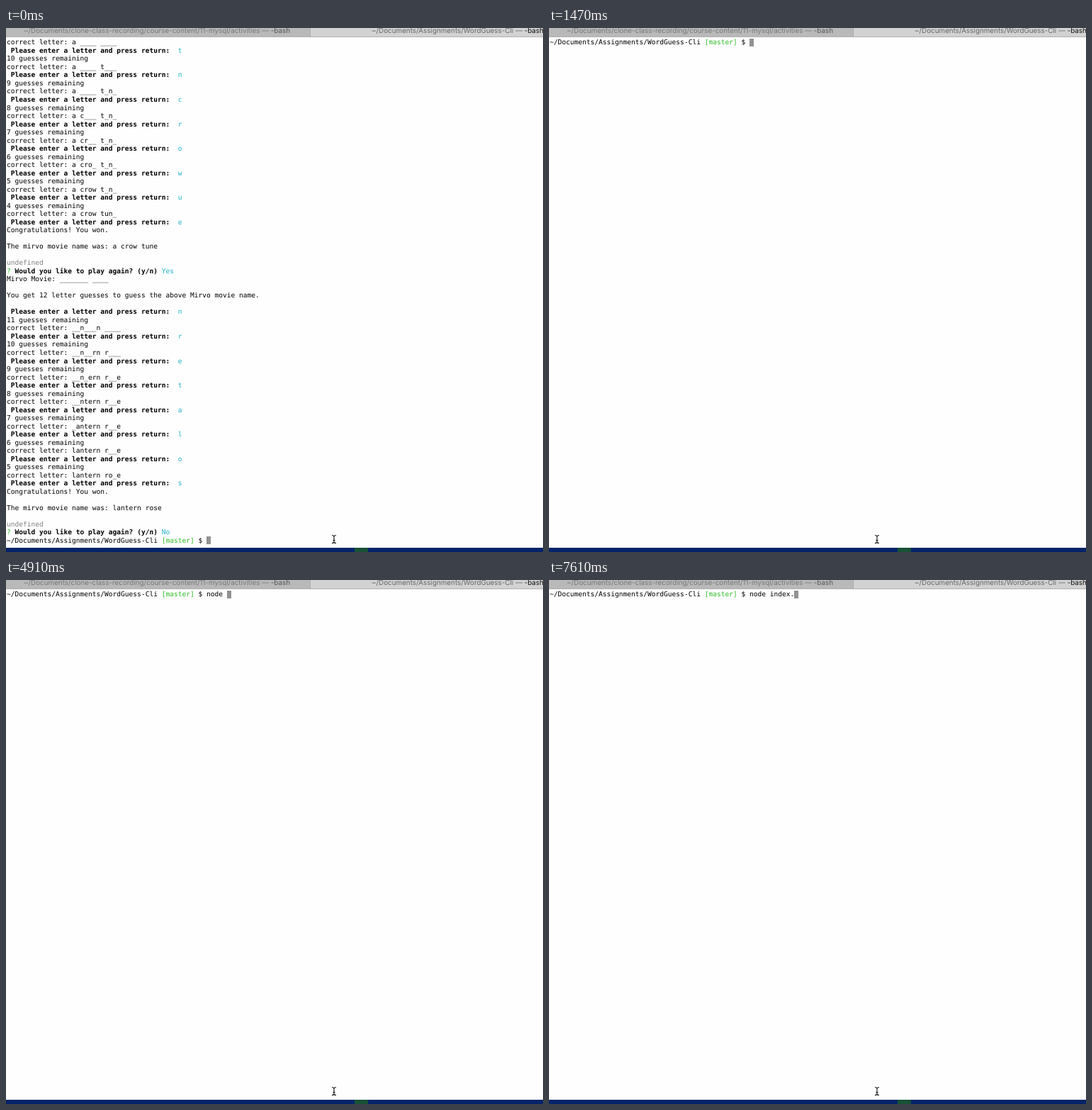
These frames come from a looping animation (758x739 px, 8000 ms). An HTML page:

```html
<!DOCTYPE html>
<html lang="en">
<head>
<meta charset="utf-8">
<title>Word guessing game in a terminal</title>
<style>
  html, body { margin: 0; width: 100%; height: 100%; overflow: hidden; background: #fefefe; }
  body { position: relative; text-rendering: geometricPrecision; }
  .tab {
    position: absolute; top: 0; height: 13px; box-sizing: border-box; overflow: hidden;
    border-bottom: 1px solid #b0b0b0; white-space: pre;
    font: 9.85px/14px Inter, "Liberation Sans", sans-serif;
  }
  .tab span { position: absolute; top: -3px; }
  #back { left: 0; width: 430px; background: #b9b9b9; color: #777; border-right: 1px solid #aaa; }
  #back span { left: 25px; }
  #back b { font-weight: 400; color: #555; }
  #front { left: 430px; width: 328px; background: #d2d2d2; color: #666; }
  #front span { left: 86px; }
  #front b { font-weight: 400; color: #111; }
  #screen {
    position: absolute; left: .9px; top: 15.4px; margin: 0; color: #000;
    font: 9.57px/11.52px "DejaVu Sans Mono", monospace; font-variant-ligatures: none;
  }
  .answer { color: #20b2c6; }
  .green { color: #2fbd25; }
  .dim { color: #808080; }
  .cursor { position: relative; top: -.4px; background: #929292; }
  #desktop { position: absolute; left: 0; top: 733px; width: 758px; height: 6px; background: #04246a; }
  #desktop i { position: absolute; left: 492px; width: 19px; height: 6px; background: #185136; }
  #pointer { position: absolute; left: 458px; top: 714px; }
</style>
</head>
<body>
<div class="tab" id="back"><span>~/Documents/clone-class-recording/course-content/11-mysql/activities — <b>-bash</b></span></div>
<div class="tab" id="front"><span>~/Documents/Assignments/WordGuess-Cli — <b>-bash</b></span></div>
<pre id="screen"></pre>
<div id="desktop"><i></i></div>
<svg id="pointer" width="10" height="14" fill="none" stroke="#111" stroke-width="1.1">
  <path d="M2 1.5Q5 1.5 5 3.5Q5 1.5 8 1.5M5 3V11M2 12.5Q5 12.5 5 10.5Q5 12.5 8 12.5M3.5 8.5H6.5"/>
</svg>
<script>
const LOOP = 8000;
const CLEARED_AT = 1470;
const typed = [
  { text: "clear", times: [290, 430, 730, 1030, 1320] },
  { text: "node index.", times: [3420, 3570, 3870, 4020, 4910, 5510, 5660, 5960, 6110, 7460, 7610] },
];

const span = (style, text) => `<span class="${style}">${text}</span>`;
const mask = (title, known) => title.replace(/[a-z]/g, c => known.includes(c) ? c : "_");

function playRound(title, known, guesses, left, again) {
  const lines = [];
  [...guesses].forEach((letter, i) => {
    known += letter;
    lines.push(`<b> Please enter a letter and press return:</b>  ${span("answer", letter)}`);
    if (i < guesses.length - 1)
      lines.push(`${left - i} guesses remaining`, `correct letter: ${mask(title, known)}`);
  });
  return [
    ...lines,
    "Congratulations! You won.", "",
    `The mirvo movie name was: ${title}`, "",
    span("dim", "undefined"),
    `${span("green", "?")} <b>Would you like to play again? (y/n)</b> ${span("answer", again)}`,
  ];
}

const first = "a crow tune", second = "lantern rose";
const history = [
  `correct letter: ${mask(first, "a")}`,
  ...playRound(first, "a", "tncrowue", 10, "Yes"),
  `Mirvo Movie: ${mask(second, "")}`, "",
  "You get 12 letter guesses to guess the above Mirvo movie name.", "",
  ...playRound(second, "", "nretalos", 11, "No"),
].join("\n") + "\n";

const prompt = `~/Documents/Assignments/WordGuess-Cli ${span("green", "[master]")} $ `;
const screenEl = document.getElementById("screen");
let shown = "";

function draw(now) {
  const t = now % LOOP;
  const cleared = t >= CLEARED_AT;
  const { text, times } = typed[+cleared];
  const input = text.slice(0, times.filter(at => at <= t).length);
  const html = (cleared ? "" : history) + prompt + input + span("cursor", " ");
  if (html !== shown) screenEl.innerHTML = shown = html;
  requestAnimationFrame(draw);
}
draw(performance.now());
</script>
</body>
</html>
```
